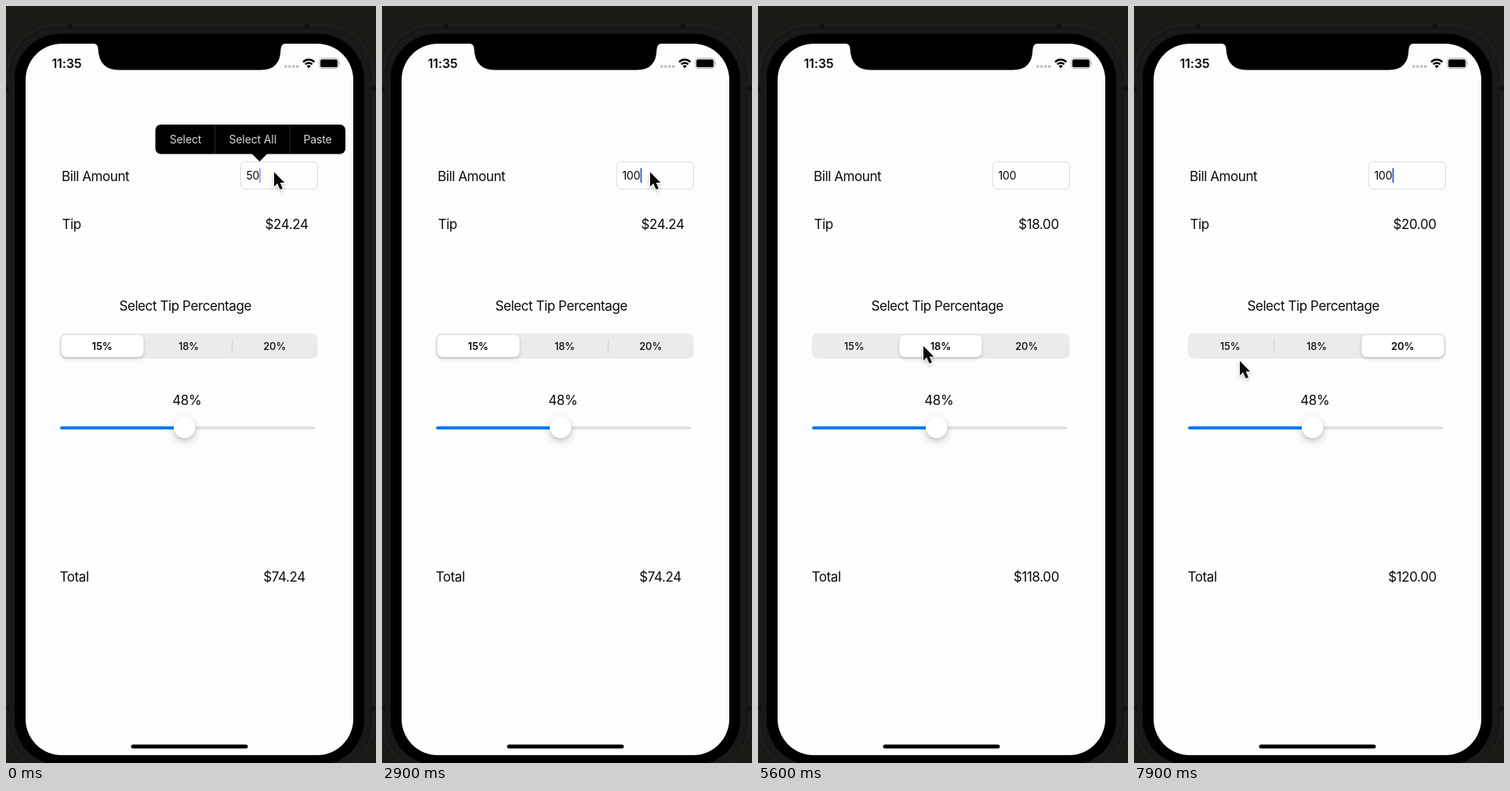
Animation of 472x964 px, one loop 8 s. Source, as an HTML page:

```html
<!DOCTYPE html>
<html lang="en">
<head>
<meta charset="utf-8">
<title>Tip calculator</title>
<style>
html, body { margin: 0; height: 100%; overflow: hidden; background: #1a1b15; }
svg { display: block; width: 472px; height: 964px; }
text { font: 17px Inter, "Liberation Sans", sans-serif; letter-spacing: -.41px; fill: #0a0a0a; }
.mid { text-anchor: middle; }
#clock { font-size: 16px; font-weight: 600; letter-spacing: -.1px; }
#bill { font-size: 14px; letter-spacing: -.2px; }
#menu text { font-size: 14px; letter-spacing: -.12px; fill: #d6d6d6; }
.seg { font-size: 13px; font-weight: 500; letter-spacing: -.1px; }
.shadow { filter: drop-shadow(0 2px 2px #0003); }
.float { filter: drop-shadow(0 1px 1px #0002) drop-shadow(0 4px 5px #0003); }
</style>
</head>
<body>
<svg viewBox="0 0 472 964">
  <!-- device -->
  <rect x="-.5" y="22" width="471" height="958" rx="66" fill="#1d1d1d"/>
  <rect x="4" y="27" width="462" height="948" rx="62" fill="#191919" stroke="#141414"/>
  <path d="M82 22v7M384 22v7M0 105h5M466 105h5M0 895h5M466 895h5" stroke="#111" stroke-width="5"/>
  <rect x="11" y="35.500" width="446" height="931" rx="58"/>
  <rect x="25" y="48" width="418" height="906" rx="46" fill="#fdfdfd"/>
  <path d="M111 47.500Q117.500 48 117.500 55Q119 81.500 144 81.500H325Q350 81.500 350.500 55Q351 48 357 47.500Z"/>
  <rect x="159.500" y="940.500" width="149" height="5" rx="2.500"/>

  <!-- status bar -->
  <text id="clock" class="mid" x="77.500" y="79">11:35</text>
  <path d="M356.800 77h16" stroke="#c3c3c3" stroke-width="4" stroke-linecap="round" stroke-dasharray="0 5"/>
  <g fill="none" stroke="#000" stroke-width="2.400">
    <path d="M379 71.300a10 10 0 0 1 14.400 0M381.800 74.300a6.200 6.200 0 0 1 8.800 0"/>
    <path d="M386.200 79.200l-2.600-2.800a3.800 3.800 0 0 1 5.200 0z" fill="#000" stroke="none"/>
  </g>
  <rect x="399.500" y="66.500" width="25" height="13" rx="4" fill="none" stroke="#aaa"/>
  <rect x="401" y="68" width="22" height="10" rx="2.600"/>
  <path d="M425.500 71v4q1.500-2 0-4" fill="#999"/>

  <!-- form -->
  <text x="71" y="222.500">Bill Amount</text>
  <rect x="299.500" y="198.500" width="98" height="34.500" rx="5" fill="#fefefe" stroke="#dcdcdc"/>
  <text id="bill" x="306.500" y="221"></text>
  <rect id="caret" y="206.500" width="2" height="18.500" fill="#4660e0"/>
  <text x="71.500" y="283.500">Tip</text>
  <text id="tip" class="mid" x="358" y="283.500"></text>
  <text class="mid" x="228.700" y="387.500">Select Tip Percentage</text>

  <rect x="68.500" y="417" width="329" height="32" rx="8" fill="#ebebeb"/>
  <path id="sep1" d="M178.500 424.500v18" stroke="#d2d2d2"/>
  <path id="sep2" d="M288.500 424.500v18" stroke="#d2d2d2"/>
  <rect id="pill" class="shadow" x="70.500" y="419" width="105" height="28" rx="6.500" fill="#fff"/>
  <text class="seg mid" x="122.700" y="438">15%</text>
  <text class="seg mid" x="233" y="438">18%</text>
  <text class="seg mid" x="342.700" y="438">20%</text>

  <text class="mid" x="230.700" y="508">48%</text>
  <rect x="69" y="535.300" width="325" height="4" rx="2" fill="#e0e0e0"/>
  <rect x="69" y="535.300" width="160" height="4" rx="2" fill="#0a78fb"/>
  <circle class="float" cx="227.700" cy="536.800" r="13.800" fill="#fff"/>

  <text x="68.500" y="732.500">Total</text>
  <text id="total" class="mid" x="355" y="732.500"></text>

  <!-- edit menu -->
  <g id="menu">
    <rect x="190.500" y="151" width="242.500" height="37.500" rx="7"/>
    <path d="M313.500 188h20l-10 10z"/>
    <path d="M266.500 151v37M362 151v37" stroke="#2c2c2c"/>
    <text class="mid" x="229" y="175">Select</text>
    <text class="mid" x="314.700" y="175">Select All</text>
    <text class="mid" x="397.500" y="175">Paste</text>
  </g>

  <path id="mouse" class="shadow" d="M0 0V18.500L4.200 14.600 7.600 22.300 11 20.800 7.700 13.400H13.300Z"
        fill="#0a0a0a" stroke="#fff" stroke-width="2" paint-order="stroke"/>
</svg>
<script>
const $ = id => document.getElementById(id);
const segs = document.querySelectorAll('.seg');
const smooth = u => u * u * (3 - 2 * u);
const ramp = (t, a, b) => Math.min(1, Math.max(0, (t - a) / (b - a)));
const last = (list, t) => list.filter(k => k[0] <= t).pop();

// time, field text, caret x
const typed = [[0, '50', 323], [200, '5', 314.500], [300, '', 306.500],
  [1600, '1', 312.500], [1700, '10', 321], [1900, '100', 329.500]];

// time, tip, total
const sums = [[0, '$24.24', '$74.24'], [4700, '$18.00', '$118.00'], [7000, '$20.00', '$120.00']];

// time, x, y of the pointer tip
const route = [[0, 342, 211.500], [3500, 342, 211.500], [4100, 205, 425], [4300, 211, 433],
  [5800, 211, 433], [6700, 333, 430], [7100, 333, 430], [7500, 340, 431], [7900, 135, 452], [8000, 135, 452]];

function pointer(t) {
  const i = route.findIndex(k => k[0] > t);
  const [a, ax, ay] = route[i - 1], [b, bx, by] = route[i];
  const u = smooth((t - a) / (b - a));
  return [ax + (bx - ax) * u, ay + (by - ay) * u];
}

// One-second blink that fades both ways; typing restarts it.
function caretAlpha(t) {
  if (t < 100) return .5;
  if (t < 800 || (t >= 1300 && t < 2400)) return 1;
  const p = t < 1300 ? t - 800 : (t - 2400) % 1000;
  return p < 400 ? 1 - ramp(p, -100, 200) : ramp(p, 300, 500);
}

function draw(t) {
  const [, text, x] = last(typed, t);
  const [, tip, total] = last(sums, t);
  $('bill').textContent = text;
  $('caret').setAttribute('x', x);
  $('caret').style.opacity = caretAlpha(t);
  $('tip').textContent = tip;
  $('total').textContent = total;
  $('menu').style.opacity = 1 - ramp(t, 0, 300);

  const pos = smooth(ramp(t, 4600, 5000)) + smooth(ramp(t, 6900, 7300));
  $('pill').setAttribute('x', 70.500 + 110 * pos);
  $('sep1').style.opacity = Math.max(0, pos - 1);
  $('sep2').style.opacity = Math.max(0, 1 - pos);
  segs.forEach((s, i) => s.style.fontWeight = Math.round(pos) === i ? 600 : 500);
  $('mouse').setAttribute('transform', `translate(${pointer(t)})`);
}

const start = performance.now();
function tick() {
  const t = (performance.now() - start) % 8000;
  draw(Math.floor(t / 100) * 100);
  requestAnimationFrame(tick);
}
tick();
</script>
</body>
</html>
```
